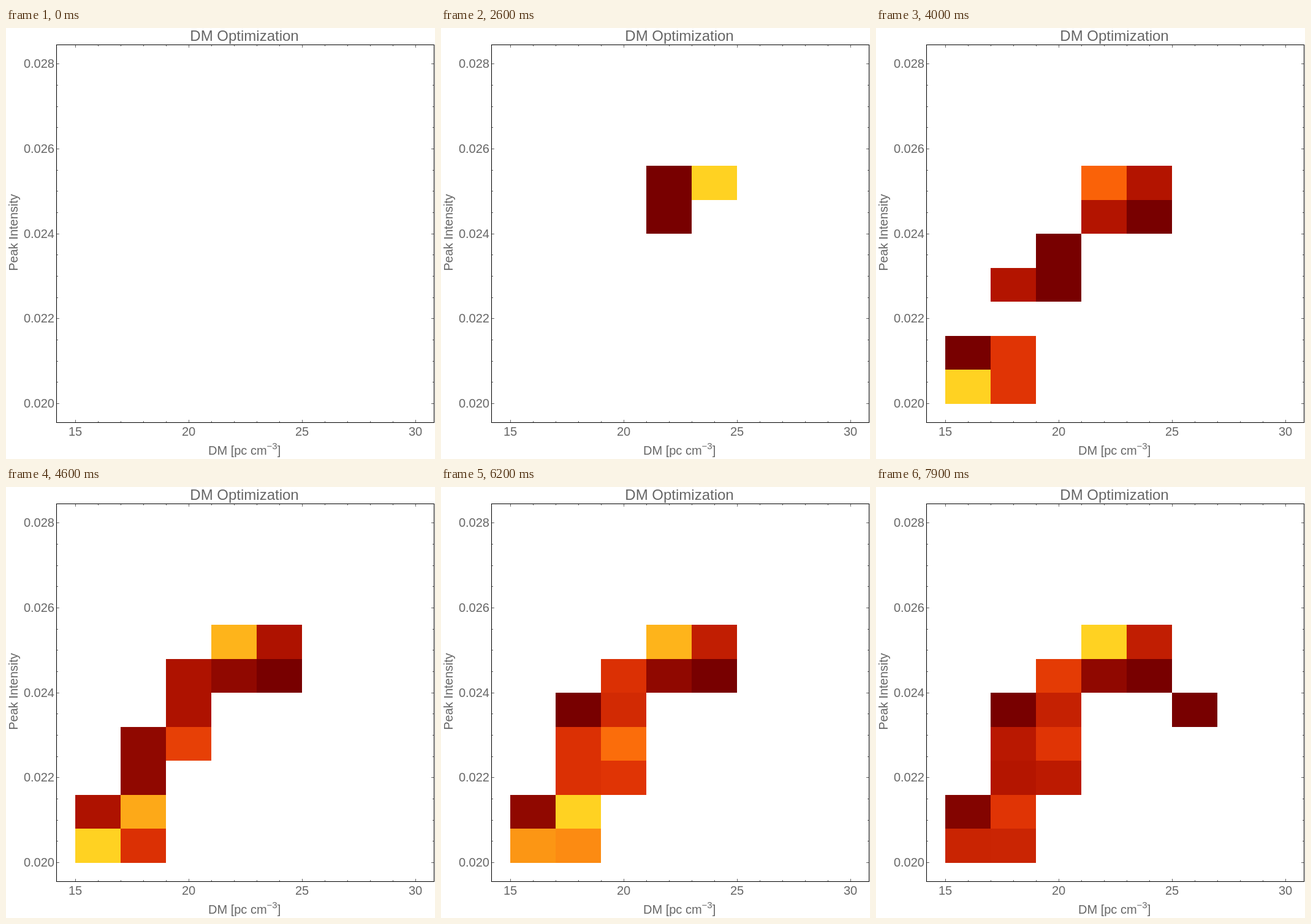
An HTML page that plays this animation: 700x704 px, repeating every 8 s.

```html
<!DOCTYPE html>
<html lang="en">
<head>
<meta charset="utf-8">
<title>DM Optimization</title>
<style>
html, body { margin: 0; width: 100%; height: 100%; overflow: hidden; background: #fff; }
svg { display: block; width: 700px; height: 704px; }
text { font-family: "Liberation Sans", Arial, sans-serif; font-size: 20px; fill: #666; }
</style>
</head>
<body>
<svg viewBox="0 0 700 704">
  <g id="cells" shape-rendering="crispEdges"></g>
  <g id="ticks" stroke="#666" shape-rendering="crispEdges"></g>
  <rect x="82.5" y="27.5" width="616" height="617" fill="none" stroke="#000" shape-rendering="crispEdges"/>
  <g id="labels"></g>
  <text x="389" y="21" text-anchor="middle" style="font-size:24px">DM Optimization</text>
  <text x="330" y="697">DM [pc cm<tspan dy="-9" style="font-size:15px">−3</tspan><tspan dy="9">]</tspan></text>
  <text transform="translate(19 334) rotate(-90)" text-anchor="middle">Peak Intensity</text>
</svg>
<script>
const LOOP = 8000;
const $ = id => document.getElementById(id);
const mix = (a, b, p) => a + (b - a) * p;

function add(parent, tag, attrs, text) {
  const el = document.createElementNS('http://www.w3.org/2000/svg', tag);
  for (const k in attrs) el.setAttribute(k, attrs[k]);
  if (text) el.textContent = text;
  return parent.appendChild(el);
}

// Axes
const tick = (x, y, dx, dy) => add($('ticks'), 'path', { d: `M${x} ${y}l${dx} ${dy}` });

for (let i = 0; i <= 15; i++) {
  const x = 113 + 37 * i, major = i % 5 === 0, n = major ? 5 : 3;
  tick(x + 0.5, 645, 0, -n);
  tick(x + 0.5, 27, 0, n);
  if (major) add($('labels'), 'text', { x, y: 666, 'text-anchor': 'middle' }, 15 + i);
}
for (let i = 0; i <= 16; i++) {
  const y = Math.floor(613.6 - 34.68 * i), major = i % 4 === 0, n = major ? 5 : 3;
  tick(82, y + 0.5, n, 0);
  tick(699, y + 0.5, -n, 0);
  if (major) add($('labels'), 'text', { x: 79, y: y + 7, 'text-anchor': 'end' }, (0.02 + i / 2000).toFixed(3));
}

// Density from 0 to 1 becomes dark red, red, orange, yellow
const RAMP = [
  [0, 120, 0, 0], [0.25, 179, 20, 0], [0.5, 224, 52, 5], [0.7, 250, 98, 8], [1, 255, 210, 34]
];

function shade(v) {
  const i = Math.max(1, RAMP.findIndex(s => s[0] >= v));
  const [a, ...low] = RAMP[i - 1], [b, ...high] = RAMP[i];
  return `rgb(${low.map((c, k) => Math.round(mix(c, high[k], (v - a) / (b - a))))})`;
}

// Single hits until SPREAD, then the cells fill up; after FADE the peak outgrows the slope
const SPREAD = 3300, FILL = 4000, TURN = 4600, FADE = 6200, END = 7800;
const PEAK = 3;
const cells = [];

function cell(col, row, born, { hit = Infinity, fill = 0, turn = 0, full = 0 } = {}) {
  const edge = r => Math.round(225 + r * 389 / 7);
  const el = add($('cells'), 'rect', {
    x: 113 + 74 * col, y: edge(row), width: 74, height: edge(row + 1) - edge(row)
  });
  const away = PEAK - col + row;
  const last = col < PEAK ? full * (0.25 + 1.75 / away) : full;
  const first = hit <= SPREAD ? 1 : 0;
  const keys = [[SPREAD, first], [FILL, fill], [TURN, turn], [FADE, full], [END, last]]
    .filter(k => k[0] > born);
  if (born >= SPREAD) keys.unshift([born, 0]);
  cells.push({ el, born, hit, keys });
}

cell(4, 0, 200, { hit: 2600, fill: 0.25, turn: 0.23, full: 0.33 });
cell(3, 0, 1800, { hit: 3000, fill: 0.7, turn: 0.92, full: 0.92 });
cell(3, 1, 2000, { fill: 0.25, turn: 0.1, full: 0.1 });
cell(0, 6, 2900, { hit: 3300, fill: 1, turn: 1, full: 0.84 });
cell(1, 6, 3200, { fill: 0.5, turn: 0.47, full: 0.81 });
cell(1, 3, 3200, { fill: 0.25, turn: 0.1, full: 0.47 });
cell(1, 5, 3500, { fill: 0.5, turn: 0.89, full: 1 });
cell(2, 3, 3700, { turn: 0.55, full: 0.73 });
cell(4, 1, 3800);
cell(2, 2, 3900, { turn: 0.23, full: 0.42 });
cell(0, 5, 4000, { turn: 0.23, full: 0.1 });
cell(2, 1, 4200, { turn: 0.23, full: 0.47 });
cell(1, 4, 4300, { turn: 0.1, full: 0.47 });
cell(2, 4, 4800, { full: 0.5 });
cell(1, 2, 6000);
cell(5, 2, 7300);

function density({ born, hit, keys }, t) {
  if (t < born) return -1;
  if (t < SPREAD) return t < hit ? 0 : 1;
  const i = keys.findIndex(k => k[0] > t);
  if (i < 0) return keys.length ? keys[keys.length - 1][1] : 0;
  if (i === 0) return 0;
  const [a, from] = keys[i - 1], [b, to] = keys[i];
  return mix(from, to, (t - a) / (b - a));
}

function draw(time) {
  // samples arrive in steps, more rarely in the second half
  const step = time < 5200 ? 100 : 200;
  const t = Math.floor(time / step) * step;
  const values = cells.map(c => density(c, c.born > t && c.born <= time ? c.born : t));
  const max = Math.max(...values);
  cells.forEach(({ el }, i) => {
    const v = values[i];
    el.setAttribute('visibility', v < 0 ? 'hidden' : 'visible');
    // the densest cell always takes the top colour
    if (v >= 0) el.setAttribute('fill', shade(v > 0 && v === max ? 1 : v));
  });
}

const start = performance.now();
function frame() {
  draw((performance.now() - start) % LOOP);
  requestAnimationFrame(frame);
}
draw(0);
requestAnimationFrame(frame);
</script>
</body>
</html>
```
